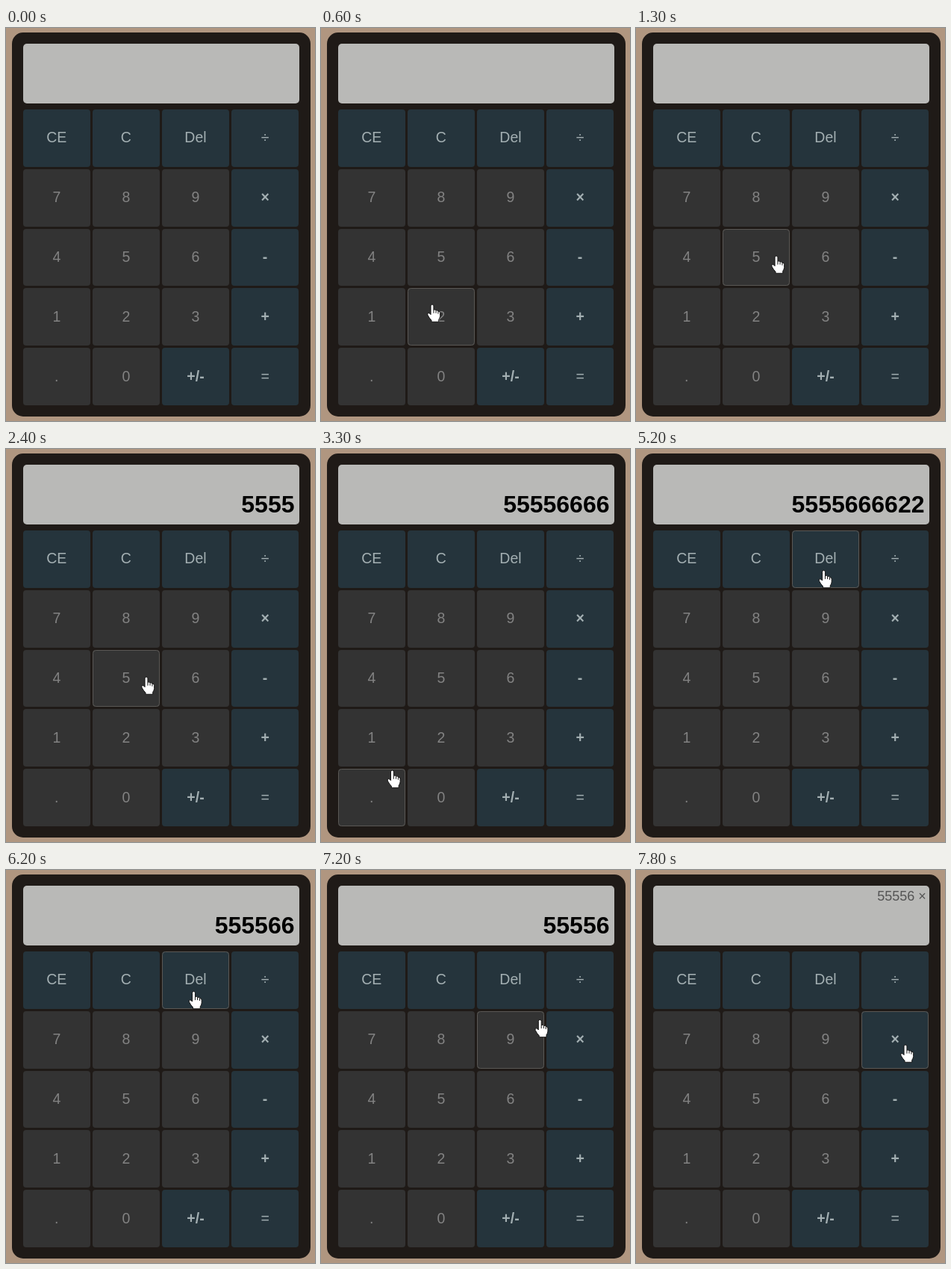
An HTML page with a canvas for the animation above (8 s loop, 414x526 px).

```html
<!DOCTYPE html>
<html lang="en">
<head>
<meta charset="utf-8">
<title>Calculator</title>
<style>
  html, body { margin: 0; width: 100%; height: 100%; overflow: hidden; background: #b09680; }
  canvas { display: block; }
</style>
</head>
<body>
<canvas id="stage" width="414" height="526"></canvas>
<script>
const ctx = document.getElementById('stage').getContext('2d');
const FONT = '"Liberation Sans", Arial, sans-serif';
const LOOP = 8000, STEP = 100, OPERATOR_TIME = 7800;

// Keys sit on a fractional grid whose edges snap to whole pixels
const keys = 'CE C Del ÷ 7 8 9 × 4 5 6 - 1 2 3 + . 0 +/- ='.split(' ').map((label, i) => {
  const left = 23 + (i % 4) * 93.1, top = 109 + Math.floor(i / 4) * 79.8;
  const x = Math.round(left), y = Math.round(top);
  return {
    label, x, y,
    w: Math.round(left + 90.2) - x,
    h: Math.round(top + 76.8) - y,
    textX: left + 44.8,
    textY: Math.round(top + 44.4),
    digit: /[\d.]/.test(label),
    weight: /[×+-]/.test(label) ? 'bold ' : ''
  };
});

// Runs of evenly spaced clicks on one key
const clicks = [
  { key: '5', start: 1640, gap: 230, times: 4 },
  { key: '6', start: 2650, gap: 150, times: 4 },
  { key: '2', start: 3500, gap: 300, times: 3 },
  { key: 'Del', start: 5200, gap: 250, times: 5 },
  { key: 'Del', start: 6800, gap: 0, times: 1 }
];

// Each move curves from the last resting point through `via` to `to`
const entry = [389, 385];
const moves = [
  { start: 100, end: 600, via: [150, 165], to: [149, 370] },
  { start: 600, end: 1100, via: [250, 385], to: [188, 305] },
  { start: 2500, end: 2700, via: [215, 308], to: [240, 308] },
  { start: 3100, end: 3500, via: [100, 440], to: [134.5, 369.5] },
  { start: 4300, end: 4900, via: [228, 90], to: [251.5, 162.5] },
  { start: 7100, end: 7500, via: [300, 205], to: [361, 234] }
];

const hand = new Path2D('M-2 2Q-2 0 0 0Q2 0 2 2V7.5Q4.5 6.3 5.2 8.3Q7.6 7.4 8.2 9.4' +
  'Q11 9 11 12V16Q10.6 19 9 21V24H-1V22Q-4 19 -6.3 14.5Q-7 11.5 -5 11.8Q-3.5 12 -2 14Z');
const knuckles = new Path2D('M2 7.5V12M5.2 8.5V12M8.2 9.5V13');

function numberAt(t) {
  let value = '';
  for (const { key, start, gap, times } of clicks) {
    for (let i = 0; i < times && start + i * gap <= t; i++) {
      value = key === 'Del' ? value.slice(0, -1) : value + key;
    }
  }
  return value;
}

function pointerAt(t) {
  if (t < moves[0].start) return null;
  let from = entry;
  for (const { start, end, via, to } of moves) {
    if (t < start) break;
    if (t >= end) { from = to; continue; }
    const k = 1 - (1 - (t - start) / (end - start)) ** 2;
    return from.map((a, i) => {
      const bend = 2 * via[i] - (a + to[i]) / 2;
      return a * (1 - k) ** 2 + 2 * bend * k * (1 - k) + to[i] * k * k;
    });
  }
  return from;
}

function box(x, y, w, h, r, fill, stroke) {
  ctx.beginPath();
  ctx.roundRect(x, y, w, h, r);
  ctx.fillStyle = fill;
  ctx.fill();
  if (!stroke) return;
  ctx.beginPath();
  ctx.roundRect(x + 0.5, y + 0.5, w - 1, h - 1, r);
  ctx.strokeStyle = stroke;
  ctx.lineWidth = 1;
  ctx.stroke();
}

function text(str, x, y, font, color, align) {
  ctx.font = font + ' ' + FONT;
  ctx.fillStyle = color;
  ctx.textAlign = align;
  ctx.fillText(str, x, y);
}

function drawHand([x, y]) {
  ctx.save();
  ctx.translate(x, y);
  ctx.scale(0.97, 0.97);
  ctx.fillStyle = '#fff';
  ctx.strokeStyle = '#111';
  ctx.lineWidth = 1;
  ctx.fill(hand);
  ctx.stroke(hand);
  ctx.stroke(knuckles);
  ctx.restore();
}

function draw(t) {
  const at = pointerAt(t), number = numberAt(t);
  box(0, 0, 414, 526, 0, '#b09680');
  box(8, 6, 400, 514, 15, '#1f1a17');
  box(23, 21, 370, 80, 5, '#b9b9b7');

  if (t < OPERATOR_TIME) text(number, 386.5, 84.5, 'bold 32px', '#000', 'right');
  else text(number + ' ×', 388.7, 41, '18px', '#555', 'right');

  for (const { label, x, y, w, h, textX, textY, digit, weight } of keys) {
    const hover = at && at[0] >= x && at[0] < x + w && at[1] >= y && at[1] < y + h;
    box(x, y, w, h, 4, digit ? '#333' : '#25343c', hover && '#5a5855');
    text(label, textX, textY, weight + '19.5px', digit ? '#828282' : '#a3afb2', 'center');
  }
  if (at) drawHand(at);
}

function frame(now) {
  draw(Math.floor(now % LOOP / STEP) * STEP);
  requestAnimationFrame(frame);
}
requestAnimationFrame(frame);
</script>
</body>
</html>
```
